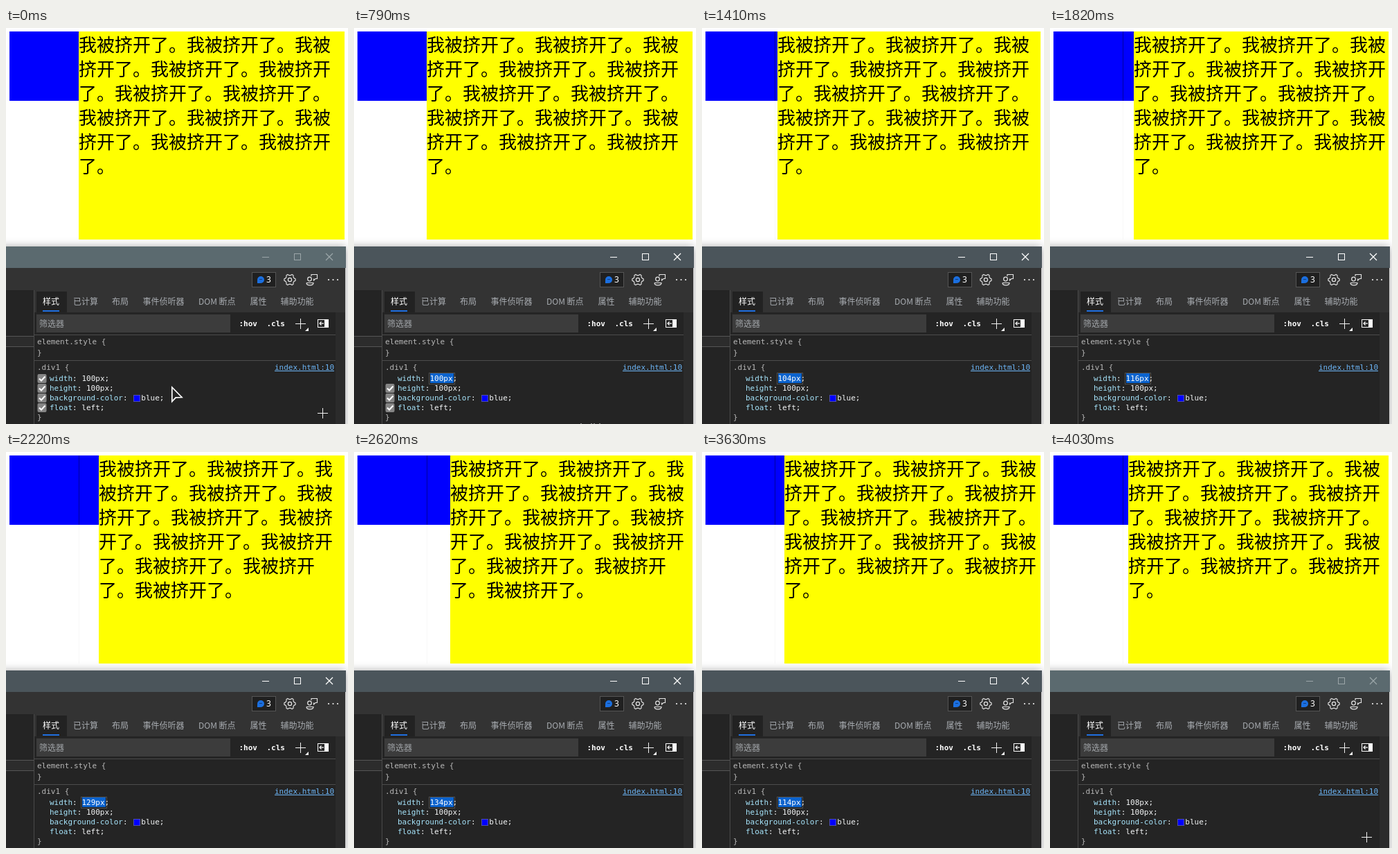
Animation of 494x571 px, one loop 4230 ms. Source, as an HTML page with a canvas:

```html
<!DOCTYPE html>
<html lang="zh-CN">
<head>
<meta charset="utf-8">
<title>Float width</title>
<style>
html, body { margin: 0; width: 100%; height: 100%; overflow: hidden; background: #fff; }
canvas { display: block; width: 494px; height: 571px; }
</style>
</head>
<body>
<canvas id="stage" width="494" height="571"></canvas>
<script>
const ctx = document.getElementById('stage').getContext('2d');
const LOOP = 4230;
const CJK = '"Noto Sans CJK SC", "Noto Sans CJK", sans-serif';
const MONO = '"DejaVu Sans Mono", monospace';
const STORY = '我被挤开了。'.repeat(12);

// [start ms, value]
const WIDTHS = [
  [0, 100], [1010, 101], [1410, 104], [1610, 110], [1820, 116], [2020, 123],
  [2220, 129], [2420, 135], [2620, 134], [3010, 133], [3230, 126],
  [3430, 120], [3630, 114], [3830, 108]
];
const POINTERS = [
  [0, ['arrow', 239, 516]], [200, ['beam', 176, 482]],
  [390, ['beam', 143, 500]], [590, ['beam', 126, 494]], [790, null]
];

function at(steps, t) {
  let value = steps[0][1];
  for (const [start, v] of steps) if (t >= start) value = v;
  return value;
}

function rect(x, y, w, h, color) {
  ctx.fillStyle = color;
  ctx.fillRect(x, y, w, h);
}

function frame(x, y, w, h, color) {
  ctx.strokeStyle = color;
  ctx.lineWidth = 1;
  ctx.strokeRect(x + 0.5, y + 0.5, w - 1, h - 1);
}

function text(s, x, y, color, font) {
  ctx.font = font;
  ctx.fillStyle = color;
  ctx.fillText(s, x, y);
}

function code(s, x, y, color, bold) {
  text(s, x, y, color, (bold ? 'bold ' : '') + '11px ' + MONO);
}

function path(points, color, width, close) {
  ctx.beginPath();
  points.forEach(([x, y], i) => i ? ctx.lineTo(x, y) : ctx.moveTo(x, y));
  if (close) ctx.closePath();
  ctx.strokeStyle = color;
  ctx.lineWidth = width;
  ctx.stroke();
}

function disc(x, y, r, color) {
  ctx.beginPath();
  ctx.arc(x, y, r, 0, Math.PI * 2);
  ctx.fillStyle = color;
  ctx.fill();
}

function ring(x, y, r, color) {
  ctx.beginPath();
  ctx.arc(x, y, r, 0, Math.PI * 2);
  ctx.strokeStyle = color;
  ctx.lineWidth = 1.2;
  ctx.stroke();
}

function plus(x, y, r) {
  rect(x - r, y, r * 2 + 1, 1, '#f2f2f2');
  rect(x, y - r, 1, r * 2 + 1, '#f2f2f2');
}

function drawPage(width, resized) {
  rect(0, 0, 494, 571, '#fff');
  const x = 5 + width;
  rect(x, 5, 489 - x, 300, '#ff0');
  rect(5, 5, width, 100, '#00f');
  if (resized) {
    // thin seam left where the two boxes first met
    rect(105, 5, 1, 100, '#0000a0');
    rect(105, 105, 1, 200, '#f8f8f8');
  }

  const perLine = Math.floor((489 - x) / 26);
  for (let i = 0, y = 34; i < STORY.length; y += 35) {
    // a line never starts with a full stop
    const n = STORY[i + perLine] === '。' ? perLine - 1 : perLine;
    [...STORY.slice(i, i + n)].forEach((c, k) =>
      text(c, x + k * 26, y, '#000', '26px ' + CJK));
    i += n;
  }
}

function drawWindow(titleOn, buttonsOn) {
  ctx.save();
  ctx.shadowColor = 'rgba(0,0,0,.4)';
  ctx.shadowBlur = 12;
  ctx.shadowOffsetY = 1;
  rect(-30, 315, 520, 300, '#242424');
  ctx.restore();

  rect(0, 315, 491, 31, titleOn ? '#4b555b' : '#5b6a6f');
  const c = buttonsOn ? '#fff' : '#9ba5a8';
  rect(370, 330, 10, 1, c);
  frame(416, 325, 10, 10, c);
  path([[462, 325], [472, 335]], c, 1.2);
  path([[472, 325], [462, 335]], c, 1.2);
}

function drawGear(x, y) {
  const points = [];
  for (let i = 0; i < 24; i++) {
    const a = (i - 0.5) * Math.PI / 12;
    const r = i % 4 < 2 ? 8.2 : 6.4;
    points.push([x + r * Math.cos(a), y + r * Math.sin(a)]);
  }
  path(points, '#e6e6e6', 1.1, true);
  ring(x, y, 2.6, '#e6e6e6');
}

function drawFeedback() {
  const c = '#e6e6e6';
  ring(438.5, 362, 2.8, c);
  ctx.beginPath();
  ctx.moveTo(434, 367.5);
  ctx.lineTo(444, 367.5);
  ctx.bezierCurveTo(444, 372, 434, 372, 434, 367.5);
  ctx.stroke();
  path([[441, 358], [441, 355.5], [449.5, 355.5], [449.5, 361.5],
    [447, 361.5], [444.5, 364], [444.5, 361.5]], c, 1.1);
}

function drawToolbar() {
  rect(0, 346, 490, 32, '#333');
  rect(356, 352, 34, 22, '#202020');
  frame(355, 352, 35, 22, '#555');
  disc(368, 363, 5, '#1b6fe0');
  rect(363, 364, 4, 4, '#1b6fe0');
  rect(366, 362, 4, 1, '#123e80');
  text('3', 376, 367, '#fff', '12px "Noto Sans", sans-serif');
  drawGear(410, 363);
  drawFeedback();
  for (const x of [466, 472.5, 479]) disc(x, 363, 1.1, '#f0f0f0');
}

function drawTabs() {
  rect(41, 378, 449, 32, '#333');
  rect(44, 380, 44, 30, '#222');
  rect(53, 407, 24, 2, '#1f6fe0');
  text('样式', 53, 399, '#fff', '500 12px ' + CJK);
  const tabs = [['已计算', 97], ['布局', 153], ['事件侦听器', 197.5],
    ['DOM 断点', 278], ['属性', 352.5], ['辅助功能', 396.5]];
  for (const [label, x] of tabs) text(label, x, 399, '#a9adb2', '12px ' + CJK);
}

function drawSidePanel() {
  rect(0, 378, 40, 193, '#242424');
  rect(0, 444, 40, 16, '#2c2c2c');
  rect(0, 444, 40, 1, '#555');
  rect(0, 459, 40, 1, '#555');
  rect(40, 378, 1, 193, '#4a4a4a');
}

function drawFilter() {
  rect(476, 410, 14, 161, '#2b2b2b');
  rect(44, 413, 280, 26, '#3c3c3c');
  text('筛选器', 48, 431, '#a0a4a8', '12px ' + CJK);
  code(':hov', 336.5, 430, '#fff', true);
  code('.cls', 376.5, 430, '#fff', true);
  plus(425, 426, 7);
  ctx.beginPath();
  ctx.moveTo(437, 432);
  ctx.lineTo(437, 437);
  ctx.lineTo(432, 437);
  ctx.fillStyle = '#f2f2f2';
  ctx.fill();

  frame(450, 420, 16, 12, '#fff');
  rect(460, 420, 6, 12, '#fff');
  path([[459, 426], [453, 426]], '#fff', 1.2);
  path([[455.5, 423.5], [453, 426], [455.5, 428.5]], '#fff', 1.2);
  rect(41, 442, 435, 1, '#4c4c4c');
  rect(41, 479, 435, 1, '#4c4c4c');
}

function drawCheck(y) {
  ctx.beginPath();
  ctx.roundRect(45.5, y, 13, 13, 2);
  ctx.fillStyle = '#858585';
  ctx.fill();
  path([[48, y + 6.5], [51, y + 9.5], [56.5, y + 3.5]], '#fff', 2);
}

function drawRules(width, editing, firstCheck, otherChecks) {
  const name = '#a6e4fb', value = '#f4f6f7', dim = '#b8b8b8';
  code('element.style {', 45, 456, dim);
  code('}', 45, 472, dim);
  code('.div1 {', 45, 493, dim);
  code('index.html:10', 388, 493, '#6cb4f5');
  rect(388, 494, 86, 1, '#6cb4f5');

  code('width', 63, 509, name);
  code(':', 96.1, 509, value);
  if (editing) {
    rect(108, 497, 38, 17, '#1c1c1c');
    frame(108, 497, 38, 17, '#505050');
    rect(110, 498, 34, 14, '#0b63ce');
  }
  code(width + 'px', 109.5, 509, editing ? '#fff' : value);
  code(';', 142.6, 509, value);

  code('height', 63, 523, name);
  code(': 100px;', 102.7, 523, value);
  code('background-color', 63, 537, name);
  code(':', 168.9, 537, value);
  rect(184, 529, 10, 10, '#00f');
  frame(184, 529, 10, 10, '#4d4db3');
  code('blue;', 195.3, 537, value);
  code('float', 63, 551, name);
  code(': left;', 96.1, 551, value);
  code('}', 45, 565, dim);

  if (firstCheck) drawCheck(499);
  if (otherChecks) [513, 527, 541].forEach(drawCheck);
}

function drawPointer([kind, x, y]) {
  if (kind === 'arrow') {
    const tip = [[x + 0.8, y + 2], [x + 0.8, y + 22.5], [x + 6.2, y + 16.8], [x + 15, y + 16.5]];
    path(tip, '#fff', 1.7, true);
    return;
  }
  rect(x + 4, y + 2, 2, 20, '#fff');
  for (const edge of [y, y + 22]) {
    rect(x, edge, 4, 2, '#fff');
    rect(x + 6, edge, 4, 2, '#fff');
  }
}

function draw(t) {
  const width = at(WIDTHS, t);
  const editing = t >= 790 && t < 4030;
  drawPage(width, t >= 1410);
  drawWindow(editing, t >= 590 && t < 4030);
  drawToolbar();
  drawSidePanel();
  drawTabs();
  drawFilter();
  drawRules(width, editing, t < 790, t < 1010);
  if (!editing) plus(457, 555, 7);
  if (t >= 590 && t < 1010) {
    // tops of a line cut off by the stage edge
    for (const x of [327, 342, 346, 354]) rect(x, 570, 2, 1, '#8c8c8c');
  }
  const pointer = at(POINTERS, t);
  if (pointer) drawPointer(pointer);
}

const begin = performance.now();
function tick() {
  draw((performance.now() - begin) % LOOP);
  requestAnimationFrame(tick);
}
tick();
</script>
</body>
</html>
```
